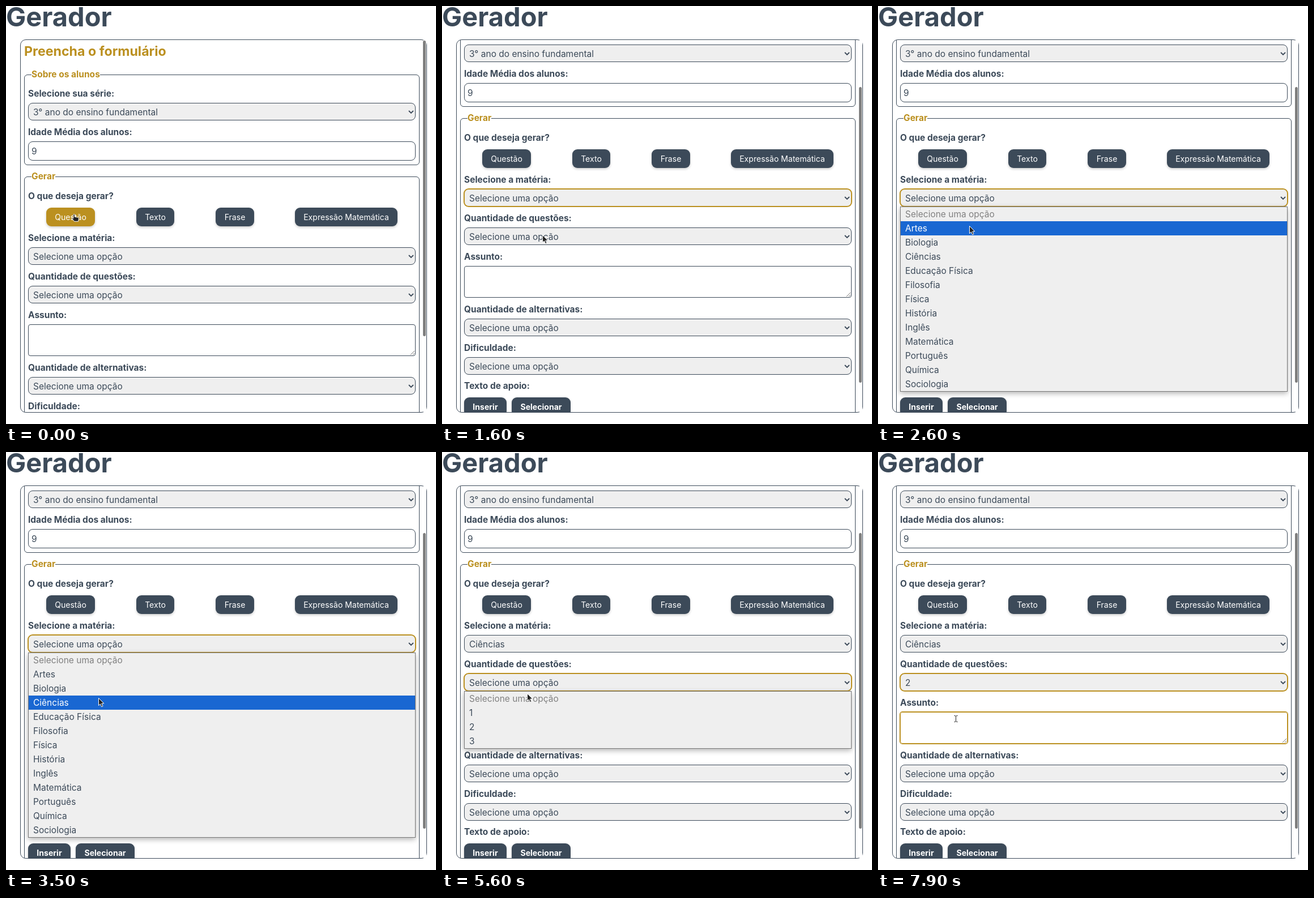
An HTML page for the animation above (8000 ms loop, 759x738 px).

```html
<!DOCTYPE html>
<html lang="pt-BR">
<head>
<meta charset="utf-8">
<title>Gerador</title>
<style>
  :root { --ink: #3c4a59; --gold: #bb9020; }
  html, body { margin: 0; width: 100%; height: 100%; overflow: hidden; background: #fff; }
  body { position: relative; font: 15.5px/20px Inter, sans-serif; font-optical-sizing: none; color: var(--ink); }
  div, svg { position: absolute; box-sizing: border-box; white-space: nowrap; }
  .title { font-size: 47px; font-weight: 700; line-height: 60px; }
  .heading { font-size: 23.2px; font-weight: 700; line-height: 30px; color: var(--gold); }
  .label, .legend { font-weight: 700; }
  .legend { color: var(--gold); background: #fff; }
  .frame { border: 1px solid var(--ink); border-radius: 10px; }
  .clip { left: 0; right: 0; top: 60px; height: 657px; overflow: hidden; }
  .group { border: 1px solid var(--ink); border-radius: 6px; }
  .field { border: 1px solid var(--ink); border-radius: 8px; }
  .select { background: #efefef; line-height: 31px; padding-left: 8px; }
  .input { line-height: 34px; padding-left: 5px; }
  .area { border-radius: 4px; }
  .field.on { border-color: var(--gold); box-shadow: 0 0 0 1px var(--gold); }
  .field svg { right: 2px; top: 10px; fill: none; stroke: var(--ink); stroke-width: 1.8; }
  .field .grip { top: auto; right: 0; bottom: 0; stroke: #777; stroke-width: 1; }
  .button { background: var(--ink); color: #fff; font-size: 14.07px; line-height: 33px; text-align: center;
            border-radius: 9px; box-shadow: 0 2px 4px rgba(0, 0, 0, .2); }
  .button.on { background: var(--gold); }
  .strong { font-weight: 700; }
  .thumb { background: #808080; border-radius: 3px; }
  .track { background: #fff; }
  .popup { background: #efefef; border: 1px solid #767676; box-shadow: 0 3px 9px rgba(0, 0, 0, .3); }
  .popup div { position: static; height: 25px; line-height: 25px; padding-left: 8px; }
  .popup div:first-child { color: #808080; }
  .popup .on { background: #1967d2; color: #fff; }
  #cursor { left: 0; top: 0; overflow: visible; }
</style>
</head>
<body>
<script>
const LOOP = 8000, STEP = 100;
const PLACEHOLDER = 'Selecione uma opção';

function add(parent, cls, x, y, w, h, text = '') {
  const el = document.createElement('div');
  el.className = cls;
  el.style.cssText = `left:${x}px;top:${y}px;` + (w ? `width:${w}px;height:${h}px` : '');
  el.textContent = text;
  parent.append(el);
  return el;
}

add(document.body, 'title', 0, -11, 0, 0, 'Gerador');
add(document.body, 'frame', 25, 59, 718, 659);
const clip = add(document.body, 'clip', 0, 60);
const page = add(clip, 'page', 0, -60, 759, 900);
add(document.body, 'track', 737, 60, 5, 657);
const thumb = add(document.body, 'thumb', 736, 61, 5, 522);

const label = (y, text) => add(page, 'label', 39, y - 10, 0, 0, text);
function select(y, text = PLACEHOLDER) {
  const el = add(page, 'field select', 39, y, 684, 31);
  el.innerHTML = '<span></span><svg width="10" height="10"><path d="M1 3l4 4 4-4"/></svg>';
  el.firstChild.textContent = text;
  return el;
}
function group(y, h, legend) {
  add(page, 'group', 32, y, 698, h);
  add(page, 'legend', 45, y - 10, 0, 0, legend);
}
const button = (x, y, w, text, cls = '') => add(page, 'button ' + cls, x, y, w, 33, text);

add(page, 'heading', 32, 65, 0, 0, 'Preencha o formulário');
group(121, 160, 'Sobre os alunos');
label(155, 'Selecione sua série:');
select(171, '3° ano do ensino fundamental');
label(223, 'Idade Média dos alunos:');
add(page, 'field input', 39, 239, 684, 34, '9');

group(301, 620, 'Gerar');
label(336, 'O que deseja gerar?');
const question = button(71, 356, 86, 'Questão');
button(230, 356, 67, 'Texto');
button(370, 356, 68, 'Frase');
button(510, 356, 181, 'Expressão Matemática');
label(410, 'Selecione a matéria:');
const subject = select(426);
label(478, 'Quantidade de questões:');
const amount = select(494);
label(546, 'Assunto:');
const topic = add(page, 'field area', 39, 562, 684, 56);
topic.innerHTML = '<svg class="grip" width="9" height="9"><path d="M1 8L8 1M5 8L8 5"/></svg>';
label(639, 'Quantidade de alternativas:');
select(655);
label(707, 'Dificuldade:');
select(723);
label(774, 'Texto de apoio:');
button(39, 794, 75, 'Inserir', 'strong');
button(123, 794, 104, 'Selecionar', 'strong');

function popup(y, options) {
  const el = add(document.body, 'popup', 39, y, 684, options.length * 25 + 27);
  for (const text of [PLACEHOLDER, ...options]) add(el, '', 0, 0, 0, 0, text);
  return el;
}
const subjects = popup(354, ['Artes', 'Biologia', 'Ciências', 'Educação Física', 'Filosofia', 'Física',
  'História', 'Inglês', 'Matemática', 'Português', 'Química', 'Sociologia']);
const amounts = popup(422, ['1', '2', '3']);

document.body.insertAdjacentHTML('beforeend', `<svg id="cursor" width="20" height="20">
  <path id="arrow" d="M.5.5V13.6L3.5 10.9 5.7 15.7 8 14.7 5.8 10H9.9Z" fill="#222" stroke="#fff"/>
  <path id="hand" d="M1 .7C2 .7 2.3 1.4 2.3 2.3V5.2L7.8 6.3C9.3 6.7 9.6 7.8 9.4 9.2L8.5 13.3H1.6L-2.4 8.4C-3 7.3-1.6 6.7-.8 7.5L-.2 8.1V2.3C-.2 1.4 0 .7 1 .7Z" fill="#222" stroke="#fff"/>
  <path id="beam" d="M-2.5-5.5H-1L.5-4.5V4.5L-1 5.5H-2.5M3.5-5.5H2L.5-4.5M3.5 5.5H2L.5 4.5" fill="none" stroke="#222"/>
</svg>`);
const [cursor, arrow, hand, beam] = ['cursor', 'arrow', 'hand', 'beam'].map(id => document.getElementById(id));

// Pointer way points: time, x, y
const path = [
  [0, 119, 367], [200, 119, 367], [500, 165, 402], [800, 177, 404], [1600, 177, 404],
  [2100, 170, 338], [2300, 170, 338], [2600, 161, 388], [3400, 161, 388], [3500, 163, 434],
  [4700, 163, 434], [4800, 164, 393], [4900, 164, 393], [5100, 163, 391], [5500, 163, 391],
  [5600, 150, 426], [5700, 150, 426], [5900, 135, 460], [6400, 135, 460], [6500, 133, 477],
  [7800, 133, 477], [7900, 137, 471], [LOOP, 137, 471]
];

function pointerAt(t) {
  const i = path.findIndex(p => p[0] > t);
  const [t0, x0, y0] = path[i - 1], [t1, x1, y1] = path[i];
  const k = (t - t0) / (t1 - t0);
  return [x0 + (x1 - x0) * k, y0 + (y1 - y0) * k].map(Math.round);
}

const show = (el, visible) => el.style.display = visible ? '' : 'none';
const light = (el, on) => el.classList.toggle('on', on);
const pick = (list, row) => [...list.children].forEach((el, i) => light(el, i === row));

function draw(t) {
  const within = (a, b) => t >= a && t < b;
  const scroll = t < 1400 ? 0 : t < 1500 ? 2 : t < 1600 ? 66 : 103;
  page.style.transform = `translateY(${-scroll}px)`;
  thumb.style.transform = `translateY(${Math.round(scroll * .796)}px)`;

  light(question, t < 400);
  light(subject, within(500, 1700) || within(2000, 5600));
  light(amount, within(1700, 1900) || t >= 4800);
  light(topic, within(4300, 4800) || t >= 7900);
  subject.firstChild.textContent = t < 4100 ? PLACEHOLDER : 'Ciências';
  amount.firstChild.textContent = t < 7900 ? PLACEHOLDER : '2';

  show(subjects, within(2200, 4100));
  pick(subjects, t < 2600 ? -1 : t < 3500 ? 1 : 3);
  show(amounts, within(5600, 7900));
  pick(amounts, t < 5900 ? -1 : t < 6500 ? 1 : 2);

  const [x, y] = pointerAt(t);
  cursor.style.transform = `translate(${x}px,${y}px)`;
  show(hand, t < 400);
  show(arrow, within(400, 7900));
  show(beam, t >= 7900);
}

const start = performance.now();
function tick() {
  const t = (performance.now() - start) % LOOP;
  draw(Math.floor(t / STEP) * STEP);
  requestAnimationFrame(tick);
}
tick();
</script>
</body>
</html>
```
